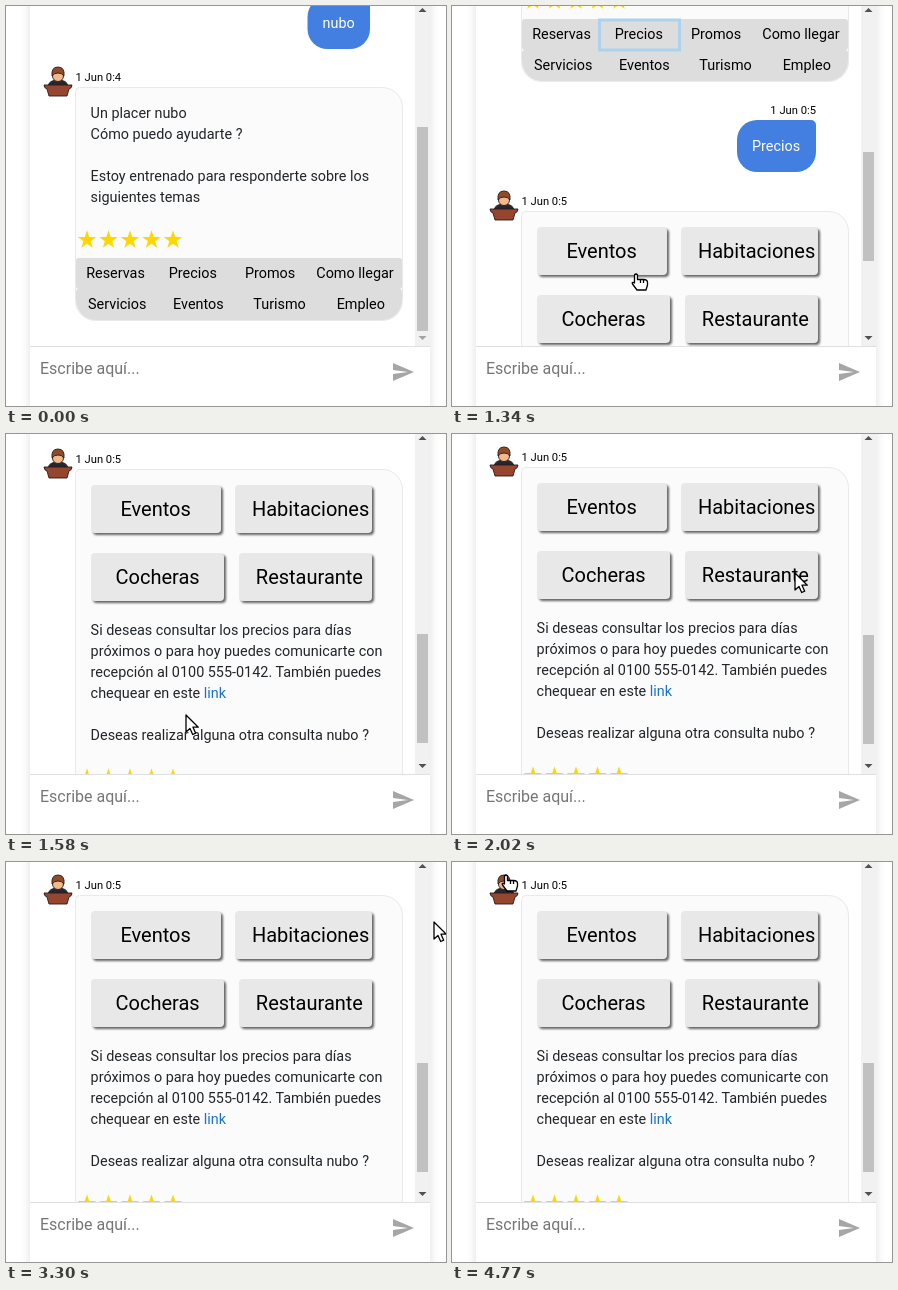
These frames come from a looping animation (440x400 px, 4800 ms). An HTML page:

```html
<!DOCTYPE html>
<html lang="es">
<head>
<meta charset="utf-8">
<style>
  html, body { margin: 0; width: 100%; height: 100%; overflow: hidden; background: #fff; }
  svg { display: block; font: 14.4px Roboto, sans-serif; fill: #212529; }
  .panel { fill: #fff; filter: drop-shadow(0 0 5px rgba(0, 0, 0, .13)); }
  .time { font-size: 11.2px; fill: #000; }
  .reply { fill: #000; text-anchor: middle; }
  .replies { fill: #ddd; }
  .option { font-size: 20px; fill: #000; text-anchor: middle; }
  .box { fill: #e8e8e8; filter: drop-shadow(2px 2px 1px rgba(0, 0, 0, .6)); }
  .user { fill: #437fe1; }
  .said { fill: #fff; }
  .bot { fill: #fbfbfb; stroke: #e9e9e9; }
  .star { fill: #ffd700; }
  .link { fill: #1a73c9; }
  .hint { font-size: 16px; fill: #757575; }
  .avatar { stroke: #2b1a1a; stroke-width: .9; }
  #cursor path { fill: #fff; stroke: #000; stroke-width: 1.3; stroke-linejoin: round; }
  #cursor .halo { stroke-width: 3; }
  #cursor .core { stroke: #fff; stroke-width: 1; }
</style>
</head>
<body>
<svg id="stage" width="440" height="400"></svg>
<script>
const LOOP = 4800;
const el = id => document.getElementById(id);
const text = (x, y, str, cls = '', extra = '') =>
  `<text x="${x}" y="${y}" class="${cls}" ${extra}>${str}</text>`;
const rect = (x, y, w, h, attrs) =>
  `<rect x="${x}" y="${y}" width="${w}" height="${h}" ${attrs}/>`;

// Rectangle with a radius for its top left, top right and both bottom corners
const card = (x, y, w, h, a, b, c, cls) => `<path class="${cls}" d="M${x + a} ${y}
  h${w - a - b}a${b} ${b} 0 0 1 ${b} ${b}v${h - b - c}a${c} ${c} 0 0 1 ${-c} ${c}
  h${2 * c - w}a${c} ${c} 0 0 1 ${-c} ${-c}v${a + c - h}a${a} ${a} 0 0 1 ${a} ${-a}z"/>`;

const userBubble = (x, y, str) =>
  card(x, y, 364 - x, 52, 20, 5, 20, 'user') + text(x + 15, y + 31, str, 'said');

const avatar = `<g class="avatar">
  <path d="M42 80q1-6 10-6t10 6z" fill="#25262f"/>
  <circle cx="52" cy="70" r="5.500" fill="#f2b98c"/>
  <path d="M46 70q-1-9 6-9t6 9q-2-3-6-3t-6 3z" fill="#8f4c29"/>
  <path d="M38 79h28q0 3-3 4l-2 7h-18l-2-7q-3-1-3-4z" fill="#96452f"/></g>`;

const star = (cx, cy) => {
  const points = Array.from({length: 10}, (_, i) => {
    const r = i % 2 ? 3.8 : 9.7, a = i * Math.PI / 5;
    return [cx + r * Math.sin(a), cy - r * Math.cos(a)];
  });
  return `<polygon class="star" points="${points.join(' ')}"/>`;
};

const row = (y, radius, labels, center) => card(70, y, 326, 31, 3, 3, radius, 'replies') +
  labels.map((label, i) => text(center(i), y + 20, label, 'reply')).join('');
const footer = dy => `<g transform="translate(0 ${dy})">
  ${[0, 1, 2, 3, 4].map(i => star(81 + 21.5 * i, 234)).join('')}
  ${row(252, 3, ['Reservas', 'Precios', 'Promos'], i => 109.5 + 77.3 * i)}
  ${text(349, 272, 'Como llegar', 'reply')}
  ${row(283, 20, ['Servicios', 'Eventos', 'Turismo', 'Empleo'], i => 111.2 + 81.2 * i)}</g>`;

const botMessage = (lines, firstY, footerDy, time, extra = '') =>
  avatar + text(69.5, 75, time, 'time') +
  card(69.5, 81.5, 327, 233 + footerDy, 4, 20, 20, 'bot') + extra +
  lines.map((line, i) => text(84.6, firstY + 21 * i, line)).join('') + footer(footerDy);

const option = (x, y, w, cx, str) =>
  rect(x, y, w, 48, 'rx="4" class="box"') + text(cx, y + 31, str, 'option');
const options = option(85, 97, 130, 149.6, 'Eventos') + option(229, 97, 137, 304.6, 'Habitaciones') +
  option(85, 165, 133, 151.6, 'Cocheras') + option(233, 165, 133, 303.4, 'Restaurante');

const beam = 'd="M-3-7h2l1 1 1-1h2M-3 7h2l1-1 1 1h2M0-6v12"';

el('stage').innerHTML = `
  <clipPath id="view">${rect(24, 0, 385, 340, '')}</clipPath>
  ${rect(24, -20, 400, 440, 'class="panel"')}
  <g clip-path="url(#view)"><g id="chat">
    ${userBubble(301.5, -9, 'nubo')}
    ${botMessage(['Un placer nubo', 'Cómo puedo ayudarte ?', '',
      'Estoy entrenado para responderte sobre los', 'siguientes temas'], 112, 0, '1 Jun 0:4')}
    <g id="asked">
      ${rect(147.5, 253, 80, 30, 'fill="none" stroke="#add2ee" stroke-width="3"')}
      ${text(364, 347, '1 Jun 0:5', 'time', 'text-anchor="end"')}
      ${userBubble(285, 353, 'Precios')}
    </g>
    <g id="answer" transform="translate(0 363)">
      ${botMessage(['Si deseas consultar los precios para días',
        'próximos o para hoy puedes comunicarte con',
        'recepción al 0100 555-0142. También puedes',
        'chequear en este <tspan class="link">link</tspan>', '',
        'Deseas realizar alguna otra consulta nubo ?'], 247, 156, '1 Jun 0:5', options)}
    </g>
  </g></g>
  ${rect(409, 0, 15, 340, 'fill="#f1f1f1"')}
  ${rect(411, 0, 11, 0, 'id="thumb" fill="#c1c1c1"')}
  <path d="M412.500 6h8l-4-4z" fill="#505050"/>
  <path id="down" d="M412.500 330h8l-4 4z"/>
  ${rect(24, 340, 400, 1, 'fill="#e0e0e0"')}
  ${text(34, 368, 'Escribe aquí...', 'hint')}
  <path d="M387 375l21-9-21-9v7l15 2-15 2z" fill="#a6a6a6"/>
  <g id="cursor">
    <path id="arrow" d="M0 0v17l4-3.500 2.700 6 3-1.300-2.700-6h5.300z"/>
    <path id="hand" d="M-1.500 9V1q1.500-2 3 0v4.500h6q4 0 4 3v2.500l-1.500 5h-9l-4.500-6q-1-2 1-1.500zM4.500 6v3m3-3v3"/>
    <g id="beam"><path class="halo" ${beam}/><path class="core" ${beam}/></g>
  </g>`;

const show = (id, on) => el(id).setAttribute('visibility', on ? 'visible' : 'hidden');
const progress = (t, from, to) => Math.min(1, Math.max(0, (t - from) / (to - from)));
const easeOut = u => 1 - (1 - u) ** 2;
const easeInOut = u => u * u * (3 - 2 * u);

// Places the pointer passes: time, x, y
const stops = [
  [1420, 184, 268], [1580, 180, 281], [2100, 354, 130], [2430, 340, 145], [2660, 133, 135],
  [2980, 110, 205], [3300, 428, 60], [3650, 125, 80], [3940, 313, 191],
  [4420, 133, 172], [4650, 133, 172], [4770, 54, 13]
];
function pointerAt(t) {
  let [, x, y] = stops[0];
  for (let i = 1; i < stops.length; i++) {
    const u = easeInOut(progress(t, stops[i - 1][0], stops[i][0]));
    x += (stops[i][1] - stops[i - 1][1]) * u;
    y += (stops[i][2] - stops[i - 1][2]) * u;
  }
  return [Math.round(x), Math.round(y)];
}
function pointerKind(t, x, y) {
  const inside = (l, top, r, b) => x >= l && x <= r && y >= top && y <= b;
  if (t < 1600) return t > 1340 && t < 1500 ? 'hand' : 'arrow';
  if (inside(38, 12, 66, 42) || inside(198, 247, 220, 267)) return 'hand';
  return inside(85, 184, 377, 267) || inside(85, 289, 362, 309) ? 'beam' : 'arrow';
}

function draw(t) {
  const asked = t >= 680, answered = t >= 1210;
  const scroll = 90 * easeOut(progress(t, 680, 850)) + 321 * easeOut(progress(t, 1243, 1609));
  el('chat').setAttribute('transform', `translate(0 ${-Math.round(scroll)})`);
  show('asked', asked);
  show('answer', answered);

  const [top, height] = answered ? [201 + (scroll - 411) * .32, 109]
    : asked ? [151 + (scroll - 90) * .51, 174] : [121, 204];
  el('thumb').setAttribute('y', Math.round(top));
  el('thumb').setAttribute('height', height);
  el('down').setAttribute('fill', answered ? '#505050' : '#a3a3a3');

  const [x, y] = pointerAt(t);
  const kind = pointerKind(t, x, y);
  el('cursor').setAttribute('transform', `translate(${x} ${y})`);
  for (const id of ['arrow', 'hand', 'beam']) show(id, asked && id === kind);
}

function tick() {
  draw(performance.now() % LOOP);
  requestAnimationFrame(tick);
}
tick();
</script>
</body>
</html>
```
